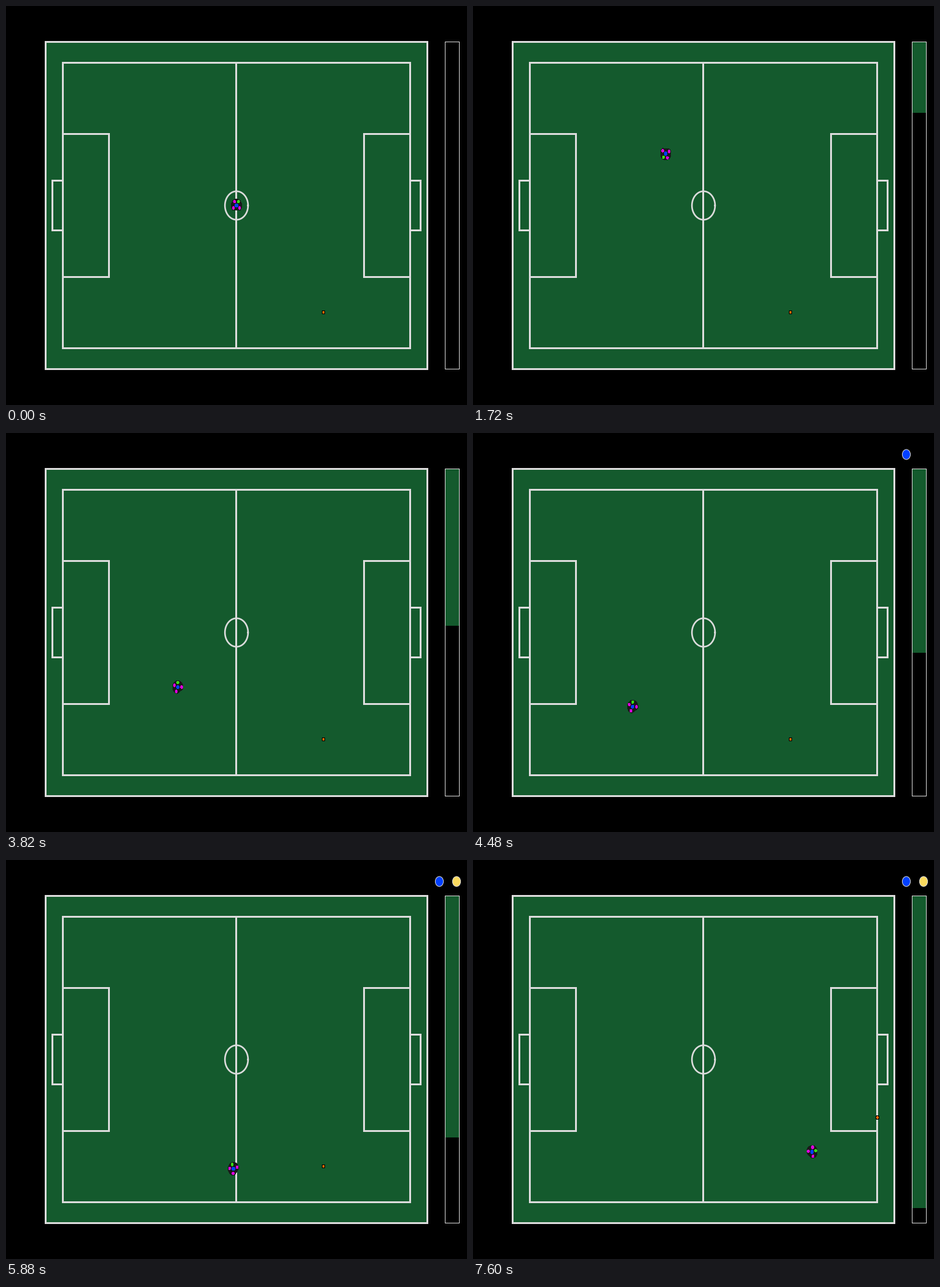
A matplotlib script for the animation above (7650 ms loop, 750 px wide and 650 px high).

```python
import numpy as np
import matplotlib.pyplot as plt
from matplotlib.animation import FuncAnimation
from matplotlib.patches import Ellipse, Polygon, Rectangle

W, H, DPI = 750, 650, 100
PX = 72 / DPI
CENTER = np.array([W / 2, H / 2])
SCALE = np.array([94.1, 116.05])   # pixels per metre, the view is stretched
LAST = 380                         # last simulation step, 20 ms per step


def rgb(r, g, b):
    return r / 255, g / 255, b / 255


GREEN, LINE = rgb(20, 90, 45), rgb(220, 220, 220)
BODY, ORANGE = rgb(25, 25, 25), rgb(253, 106, 2)
BLUE, YELLOW = rgb(0, 64, 255), rgb(250, 218, 94)
PINK, LIME = rgb(220, 0, 220), rgb(57, 220, 20)

# key poses of the robot: step, x, y, heading (degrees, clockwise on screen)
KEYS = np.array([
    (0, 375, 325, 90), (39, 306.5, 252.6, 8), (86, 313.5, 240.5, -85),
    (141, 307, 328, -63), (191, 279.5, 414, 57), (258, 274, 470.5, 38),
    (294, 370, 503, 38), (312, 443.5, 504.4, 48), (351, 505.5, 502, 95),
    (LAST, 551.5, 475.5, 132)])
TIMES, POSES = KEYS[:, 0], KEYS[:, 1:]
SLOPES = np.gradient(POSES, TIMES, axis=0)

BALL_START, BALL_END, KICK = np.array([516.5, 499]), np.array([658, 419.5]), 352
BLUE_START, BLUE_PERIOD, BLUE_TIME = 125, 84, 60
YELLOW_START = 284


def pose(s):
    """Smooth cubic motion through the key poses."""
    i = min(np.searchsorted(TIMES, s, side="right"), len(TIMES) - 1) - 1
    h = TIMES[i + 1] - TIMES[i]
    u = (s - TIMES[i]) / h
    ease = u * u * (3 - 2 * u)
    return (POSES[i] + ease * (POSES[i + 1] - POSES[i])
            + h * u * (1 - u) * ((1 - u) * SLOPES[i] - u * SLOPES[i + 1]))


def place(points, x, y, deg):
    c, s = np.cos(np.radians(deg)), np.sin(np.radians(deg))
    return (x, y) + SCALE * (np.asarray(points) @ [[c, s], [-s, c]])


def polar(r, angles):
    return r * np.column_stack((np.cos(angles), np.sin(angles)))


fig = plt.figure(figsize=(W / DPI, H / DPI), dpi=DPI, facecolor="black")
ax = fig.add_axes([0, 0, 1, 1])
ax.set_xlim(0, W)
ax.set_ylim(H, 0)
ax.axis("off")


def add(patch, z=1):
    patch.set(antialiased=False, zorder=z)
    return ax.add_patch(patch)


def disc(r, color, z):
    return add(Ellipse((0, 0), *(2 * r * SCALE), facecolor=color, lw=0), z)


def stroke(xs, ys, width=3, smooth=False):
    ax.plot(xs, ys, color=LINE, lw=width * PX, snap=not smooth, antialiased=smooth,
            solid_capstyle="projecting", solid_joinstyle="miter", zorder=2)


def box(x0, y0, x1, y1, width=3):
    stroke([x0, x1, x1, x0, x0], [y0, y0, y1, y1, y0], width)


def pixel(x, y):
    return np.floor(CENTER + SCALE * (x, y))


def field_box(x0, x1, half):
    box(*pixel(x0, -half), *pixel(x1, half))


# pitch, in metres
add(Rectangle(pixel(-3.3, -2.3), 622, 534, facecolor=GREEN, lw=0))
field_box(-3.3, 3.3, 2.3)
field_box(-3, 3, 2)
for side in (-1, 1):
    field_box(side * 3, side * 2.2, 1)
    field_box(side * 3, side * 3.18, 0.35)
stroke([374, 374], [92, 557])
ring = CENTER + SCALE * polar(0.2, np.linspace(0, 2 * np.pi, 61))
stroke(*ring.T, width=2.6, smooth=True)

# time bar and indicator lights
bar = add(Rectangle((714, 58), 23, 1, facecolor=GREEN, lw=0))
box(714, 58, 737, 591, 1)


def light(x, color):
    return ax.add_patch(Ellipse((x, 35), *(0.14 * SCALE), facecolor=color,
                                edgecolor=LINE, lw=PX))


blue, yellow = light(705, BLUE), light(733, YELLOW)

# robot with a flat front, four corner tags and a centre tag
RIM = polar(0.09, np.radians(np.linspace(40, 320, 40)))
TAGS = [(0, 0)] + [(x, side * y) for x, y in ((0.035, 0.0548), (-0.0548, 0.035))
                   for side in (1, -1)]
body = add(Polygon(RIM, facecolor=BODY, lw=0), 3)
dots = [disc(0.023 if c == BLUE else 0.0185, c, 4)
        for c in (BLUE, PINK, PINK, PINK, LIME)]
ball = [disc(0.025, "black", 5), disc(0.0145, ORANGE, 6)]


def draw(k):
    s = min(k // 2, LAST)
    bar.set_height(round(0.85 + 1.336 * s))
    blue.set_visible(s >= BLUE_START and (s - BLUE_START) % BLUE_PERIOD < BLUE_TIME)
    yellow.set_visible(s >= YELLOW_START)
    p = pose(s)
    body.set_xy(place(RIM, *p))
    for dot, c in zip(dots, place(TAGS, *p)):
        dot.set_center(c)
    u = max(0, s - KICK) / (LAST - KICK)
    for part in ball:
        part.set_center(BALL_START + u * (BALL_END - BALL_START))
    return [bar, blue, yellow, body, *dots, *ball]


anim = FuncAnimation(fig, draw, frames=765, interval=10, repeat=True,
                     repeat_delay=0, blit=False)
plt.show()
```
